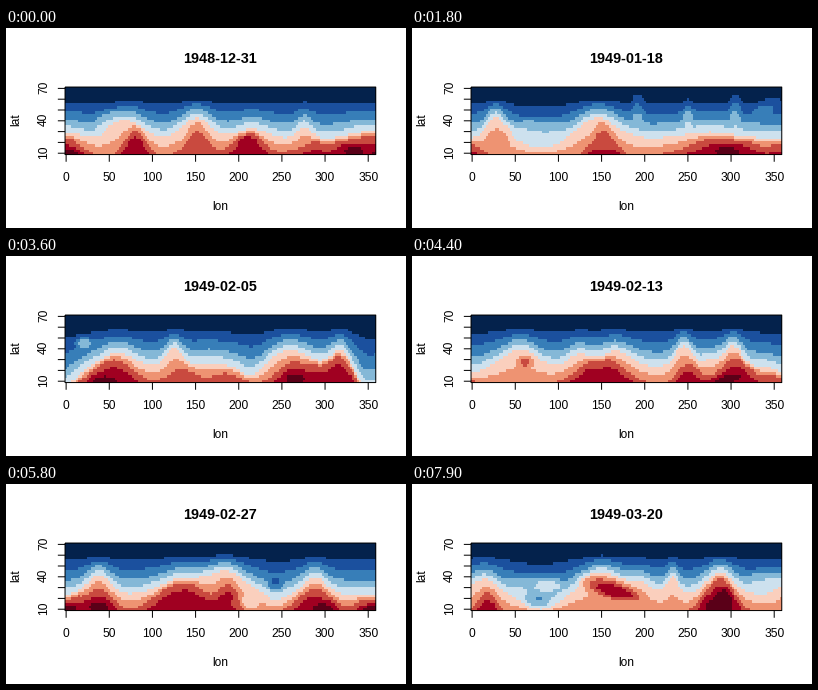
A matplotlib script that plays this animation: 400x200 px, repeating every 8 s.

```python
import matplotlib.pyplot as plt
import numpy as np
from matplotlib.animation import FuncAnimation
from matplotlib.colors import ListedColormap

W, H, DPI = 400, 200, 100
DAYS, STEP = 80, 100
LINE = 14.4                     # one text line in pixels
LEFT, RIGHT, TOP, BOTTOM = 4.1 * LINE, W - 2.1 * LINE, 4.1 * LINE, H - 5.1 * LINE
DRIFT = 5                       # eastward degrees per day
COLORS = ["#5a0018", "#a00021", "#c94a3f", "#ee9372", "#facfbd",
          "#cde1ee", "#84b8d7", "#377eb8", "#1b509e", "#04224c"]

lon = np.arange(0, 360, 2.5)
lat = np.arange(70, 9, -2.5)[:, None]
poses = []


def pose(day, front, heat, cells):
    """Weather on one day.

    front, heat: (lon, width, height) waves on the mild and the hot air edge
    cells: (lon, lat, width, height, amount=-1, tilt=0) closed highs and lows
    """
    poses.append((day, front, heat, cells))


pose(0,
     [(5, 20, 4), (72, 24, 16), (151, 23, 19), (215, 24, 9), (276, 11, 11), (340, 22, 5)],
     [(0, 25, 13), (80, 17, 26), (152, 20, 29), (211, 24, 23), (310, 50, 18)],
     [(5, 10, 14, 5), (210, 22, 11, 4), (332, 13, 18, 7), (152, 18, 22, 18, .8),
      (50, 40, 16, 11, -.8)])
pose(18,
     [(28, 15, 20), (82, 28, -9), (146, 30, 19), (275, 40, 6)],
     [(0, 15, 9), (152, 19, 30), (292, 55, 20)],
     [(297, 13, 23, 7), (152, 24, 18, 14, .7), (30, 26, 14, 10, -.5), (75, 34, 32, 9),
      (340, 52, 14, 7, -1, .3), (192, 50, 7, 14), (250, 46, 7, 12), (305, 50, 7, 14)])
pose(36,
     [(5, 18, -10), (60, 24, 13), (125, 13, 17), (165, 22, 4), (216, 16, -9),
      (260, 30, 15), (318, 16, 15), (348, 16, -18)],
     [(55, 32, 24), (135, 25, 17), (185, 25, 14), (262, 26, 21), (310, 26, 29)],
     [(42, 11, 19, 6), (265, 13, 14, 6), (20, 46, 10, 5, -1.5), (165, 15, 50, 12, .4)])
pose(44,
     [(2, 14, -6), (56, 24, 16), (124, 17, 11), (166, 24, 14), (245, 13, 19),
      (276, 14, 6), (302, 14, 19)],
     [(150, 38, 26), (250, 18, 20), (305, 26, 25), (350, 15, 8)],
     [(293, 12, 23, 5, -1, .15), (62, 29, 9, 6, -1.6)])
pose(58,
     [(38, 18, 18), (135, 34, 15), (187, 28, 20), (243, 12, -6), (288, 18, 16)],
     [(0, 18, 13), (38, 22, 23), (135, 42, 29), (190, 16, 22), (288, 28, 23), (350, 20, 11)],
     [(5, 12, 14, 5), (38, 13, 17, 6), (300, 12, 17, 6), (350, 11, 12, 4),
      (207, 14, 15, 8, 1), (243, 33, 8, 6, 1)])
pose(69,
     [(25, 45, -14), (135, 32, 17), (188, 13, 14), (216, 14, -16), (272, 26, 8), (345, 15, -5)],
     [(130, 34, 28), (182, 14, 26), (280, 36, 20)],
     [(122, 16, 26, 9), (175, 22, 9, 5), (292, 12, 16, 6), (30, 34, 42, 11, -1.2),
      (36, 45, 5, 6), (55, 33, 14, 4, -1, -.15), (30, 18, 20, 7, .8),
      (222, 38, 14, 10, -1.2), (318, 42, 14, 12, 1.3), (350, 34, 8, 11, -1.5, -.5)])
pose(79,
     [(14, 20, 14), (80, 26, -14), (150, 28, 20), (195, 20, 10), (232, 9, 16), (287, 22, 20)],
     [(18, 15, 20), (287, 24, 32)],
     [(160, 30, 38, 11, -1.2, -.2), (162, 29, 31, 8, -1, -.2), (166, 27, 21, 5, -1, -.2),
      (285, 14, 22, 9), (292, 24, 11, 7), (75, 34, 28, 10), (75, 18, 15, 6, .9),
      (87, 33, 15, 6), (338, 38, 18, 9)])


def away(x, center):
    return (x - center + 180) % 360 - 180


def waves(base, humps, x):
    return base + sum(h * np.exp(-(away(x, c) / w) ** 2) for c, w, h in humps)


def cell(x, y, cx, cy, rx, ry, amount=-1, tilt=0):
    dx = away(x, cx)
    r2 = (dx / rx) ** 2 + ((y - cy - tilt * dx) / ry) ** 2
    return amount * np.exp(-r2 ** 2)


def field(p, shift, lift):
    """Colour level of every grid point, with the weather moved east and north."""
    _, front, heat, cells = p
    x, y = lon - shift, lat - lift
    mild = waves(24, front, x)
    hot = np.minimum(waves(6, heat, x), mild - 5)
    cool = np.maximum(40 + .75 * (mild - 28), mild + 5)
    polar = 56 + .25 * (mild - 28)
    edges = np.array([hot - 32, hot - 7, hot, mild, cool, polar, 0 * x + 90])
    levels = [1.1, 2, 3, 5, 7, 9, 10]
    z = np.array([np.interp(y[:, i], edges[:, i], levels) for i in range(len(x))]).T
    return z + sum(cell(x, y, *c) for c in cells)


def weather(day):
    i = max(k for k in range(len(poses) - 1) if poses[k][0] <= day)
    a, b = poses[i], poses[i + 1]
    u = (day - a[0]) / (b[0] - a[0])
    w = u * u * (3 - 2 * u)
    rad = np.radians(lon - 8 * day)
    eddy = 4 * np.sin(5 * rad) + 2.5 * np.sin(7 * rad + 1 + .2 * day)
    lift = 4 * w * (1 - w) * eddy
    z = ((1 - w) * field(a, DRIFT * (day - a[0]), lift)
         + w * field(b, DRIFT * (day - b[0]), lift))
    return np.floor(np.clip(z, 0, 9.99))


def px(v):
    return v * 72 / DPI


def lon_x(v):
    return LEFT + (v + 1.25) * (RIGHT - LEFT) / 360


def lat_y(v):
    return BOTTOM - (v - 8.75) * (BOTTOM - TOP) / 62.5


plt.rcParams["font.family"] = "Liberation Sans"
fig = plt.figure(figsize=(W / DPI, H / DPI), dpi=DPI, facecolor="white")
ax = fig.add_axes([0, 0, 1, 1])
ax.axis("off")


def stroke(xs, ys):
    ax.plot(xs, ys, color="black", lw=px(1), solid_capstyle="butt", snap=False, zorder=3)


def label(x, y, text, size=12, **style):
    return ax.text(x, y, text, fontsize=px(size), ha="center", va="baseline",
                   rotation_mode="anchor", **style)


image = ax.imshow(weather(0), cmap=ListedColormap(COLORS), vmin=-.5, vmax=9.5,
                  extent=(LEFT, RIGHT, BOTTOM, TOP), interpolation="nearest", aspect="auto")
ax.set_xlim(0, W)
ax.set_ylim(H, 0)

stroke([LEFT, RIGHT, RIGHT, LEFT, LEFT], [TOP, TOP, BOTTOM, BOTTOM, TOP])
for v in range(0, 351, 50):
    stroke([lon_x(v)] * 2, [BOTTOM, BOTTOM + LINE / 2])
    label(lon_x(v), BOTTOM + 1.87 * LINE, str(v))
for v in range(10, 71, 10):
    stroke([LEFT - LINE / 2, LEFT], [lat_y(v)] * 2)
    if v % 30 == 10:
        label(LEFT - 1.25 * LINE, lat_y(v) - 1, str(v), rotation=90)

middle = (LEFT + RIGHT) / 2
label(middle, BOTTOM + 3.87 * LINE, "lon")
label(LEFT - 3.2 * LINE, (TOP + BOTTOM) / 2 - 1, "lat", rotation=90)
title = label(middle, 35, "", 14.4, weight="bold")


def draw(day):
    image.set_data(weather(day))
    title.set_text(str(np.datetime64("1948-12-31") + day))
    return image, title


anim = FuncAnimation(fig, draw, frames=DAYS, interval=STEP, repeat=True, repeat_delay=0)
plt.show()
```
